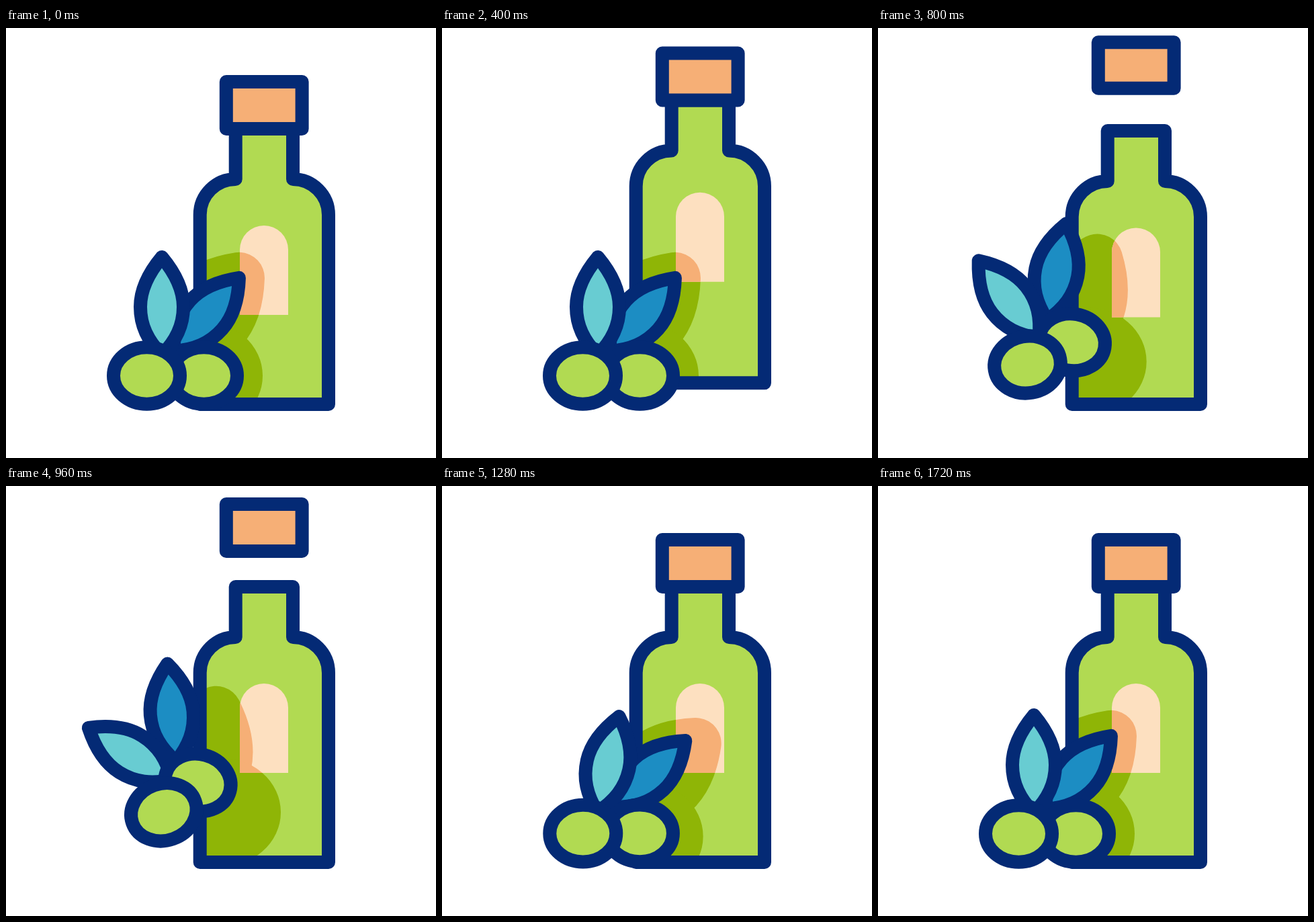
An HTML page with a canvas for the animation above (2000 ms loop, 640 by 640 pixels).

```html
<!DOCTYPE html>
<html lang="en">
<head>
<meta charset="utf-8">
<title>Olive oil</title>
<style>
  html, body { margin: 0; width: 100%; height: 100%; overflow: hidden; background: #fff; }
  canvas { display: block; width: 640px; height: 640px; }
</style>
</head>
<body>
<canvas id="stage" width="640" height="640"></canvas>
<script>
const ctx = document.getElementById('stage').getContext('2d');
const LOOP = 2000, STEP = 40, LINE = 20, SHADOW = 76;
const NAVY = '#042a75', GREEN = '#b1da52', DARK = '#8fb506', CORK = '#f6af76',
      LABEL = '#fde0c0', CYAN = '#68ccd2', BLUE = '#1c8dc3';

const clamp = u => Math.min(1, Math.max(0, u));
const mix = (a, b, u) => a + (b - a) * u;

// Sine ease from 0 to 1 between two times.
const ease = (t, from, to) => (1 - Math.cos(Math.PI * clamp((t - from) / (to - from)))) / 2;

// Bottle: crouch, jump, squash on landing, recover.
const SQUASH = 24, JUMP = -49.5;
function bottleTop(t) {
  if (t < 240) return SQUASH * ease(t, 160, 240);
  if (t < 440) return mix(SQUASH, JUMP, ease(t, 240, 440));
  if (t < 600) return mix(JUMP, SQUASH, ease(t, 440, 600));
  return mix(SQUASH, 0, ease(t, 600, 860));
}
const bottleBottom = t => -35 * (ease(t, 240, 440) - ease(t, 440, 620));

// Cork: rides the bottle, then flies as a projectile and lands with a squash.
const LAUNCH = 600, APEX = 880, LAND = 1060, HEIGHT = -66;
function corkEdge(t, start) {
  if (t < LAUNCH) return bottleTop(t);
  if (t < APEX) return mix(HEIGHT, start, ((APEX - t) / (APEX - LAUNCH)) ** 2);
  return mix(HEIGHT, 0, clamp((t - APEX) / (LAND - APEX)) ** 2);
}
const corkBottom = t => corkEdge(t, 5);
const corkTop = t => corkEdge(t, 23) + 14 * (ease(t, LAND, 1110) - ease(t, 1110, 1260));

// Olives and leaves: poses are [x, y, degrees], swung away, past rest and back.
function swing(t, rest, peak, rebound = [0, 0, 0], start = 560, land = 1320) {
  const top = start + 400;
  const out = ease(t, start, top) - ease(t, top, land);
  const back = ease(t, top, land) - ease(t, land, 1720);
  return rest.map((value, i) => value + peak[i] * out + rebound[i] * back);
}
function leftLeaf(t) {
  const [x, y] = swing(t, [232, 487], [15, -51], [-1, -1], 600, 1300);
  const [angle] = swing(t, [0], [-58], [15]);
  return [x, y, angle];
}
const rightLeaf = t => swing(t, [250, 481, 41.6], [3, -71, -46.6], [5, -1, 7.4]);
const frontOlive = t => swing(t, [209.5, 517.5, 0], [26, -33, -20], undefined, 600, 1300);
const backOlive = t => swing(t, [294.5, 517.5, 0], [-9, -76, 15], undefined, 560, 1300);
const leafShadow = t => swing(t, [250, 481, 41.6], [30, -3, -28.6], [19, 0, 7.4]);
const oliveShadow = t => swing(t, [294.5, 517.5, 0], [27, -32, 0], [6, 5, 0]);

function bottlePath(top, bottom) {
  const p = new Path2D();
  p.moveTo(341.7, 150 + top);
  p.lineTo(341.7, 225 + top);
  p.arc(341.7, 278 + top, 53, -Math.PI / 2, -Math.PI, true);
  p.lineTo(288.7, 560 + bottom);
  p.lineTo(480, 560 + bottom);
  p.arc(427, 278 + top, 53, 0, -Math.PI / 2, true);
  p.lineTo(427, 150 + top);
  p.closePath();
  return p;
}

function labelPath(dy) {
  const p = new Path2D();
  p.arc(384, 330 + dy, 36, Math.PI, 0);
  p.lineTo(420, 427 + dy);
  p.lineTo(348, 427 + dy);
  p.closePath();
  return p;
}

const leafPath = new Path2D(
  'M0-146C-20-122-32-97-32-72C-32-44-21-22 0 0C21-22 32-44 32-72C32-97 20-122 0-146Z');
const olivePath = new Path2D();
olivePath.ellipse(0, 0, 49.5, 42.3, 0, 0, Math.PI * 2);

function paint(path, fill, stroke = NAVY, width = LINE) {
  ctx.fillStyle = fill;
  ctx.strokeStyle = stroke;
  ctx.lineWidth = width;
  ctx.fill(path);
  ctx.stroke(path);
}

function place(path, [x, y, angle], ...style) {
  ctx.save();
  ctx.translate(x, y);
  ctx.rotate(angle * Math.PI / 180);
  paint(path, ...style);
  ctx.restore();
}

function castShadow(t, color) {
  place(leafPath, leafShadow(t), color, color, SHADOW);
  place(olivePath, oliveShadow(t), color, color, SHADOW);
}

function drawBottle(t) {
  const top = bottleTop(t);
  const body = bottlePath(top, bottleBottom(t));
  const label = labelPath(top * 1.16);
  ctx.save();
  ctx.clip(body);
  ctx.fillStyle = GREEN;
  ctx.fill(body);
  castShadow(t, DARK);
  ctx.fillStyle = LABEL;
  ctx.fill(label);
  ctx.clip(label);
  castShadow(t, CORK);
  ctx.restore();
  ctx.strokeStyle = NAVY;
  ctx.lineWidth = LINE;
  ctx.stroke(body);
}

function drawCork(t) {
  const cork = new Path2D(), y = 80 + corkTop(t);
  cork.rect(327.8, y, 112.8, 150 + corkBottom(t) - y);
  paint(cork, CORK);
}

function draw(t) {
  ctx.fillStyle = '#fff';
  ctx.fillRect(0, 0, 640, 640);
  ctx.lineJoin = 'round';
  drawBottle(t);
  drawCork(t);
  place(leafPath, rightLeaf(t), BLUE);
  place(leafPath, leftLeaf(t), CYAN);
  place(olivePath, backOlive(t), GREEN);
  place(olivePath, frontOlive(t), GREEN);
}

function tick() {
  const t = performance.now() % LOOP;
  draw(Math.floor(t / STEP) * STEP);
  requestAnimationFrame(tick);
}
tick();
</script>
</body>
</html>
```
